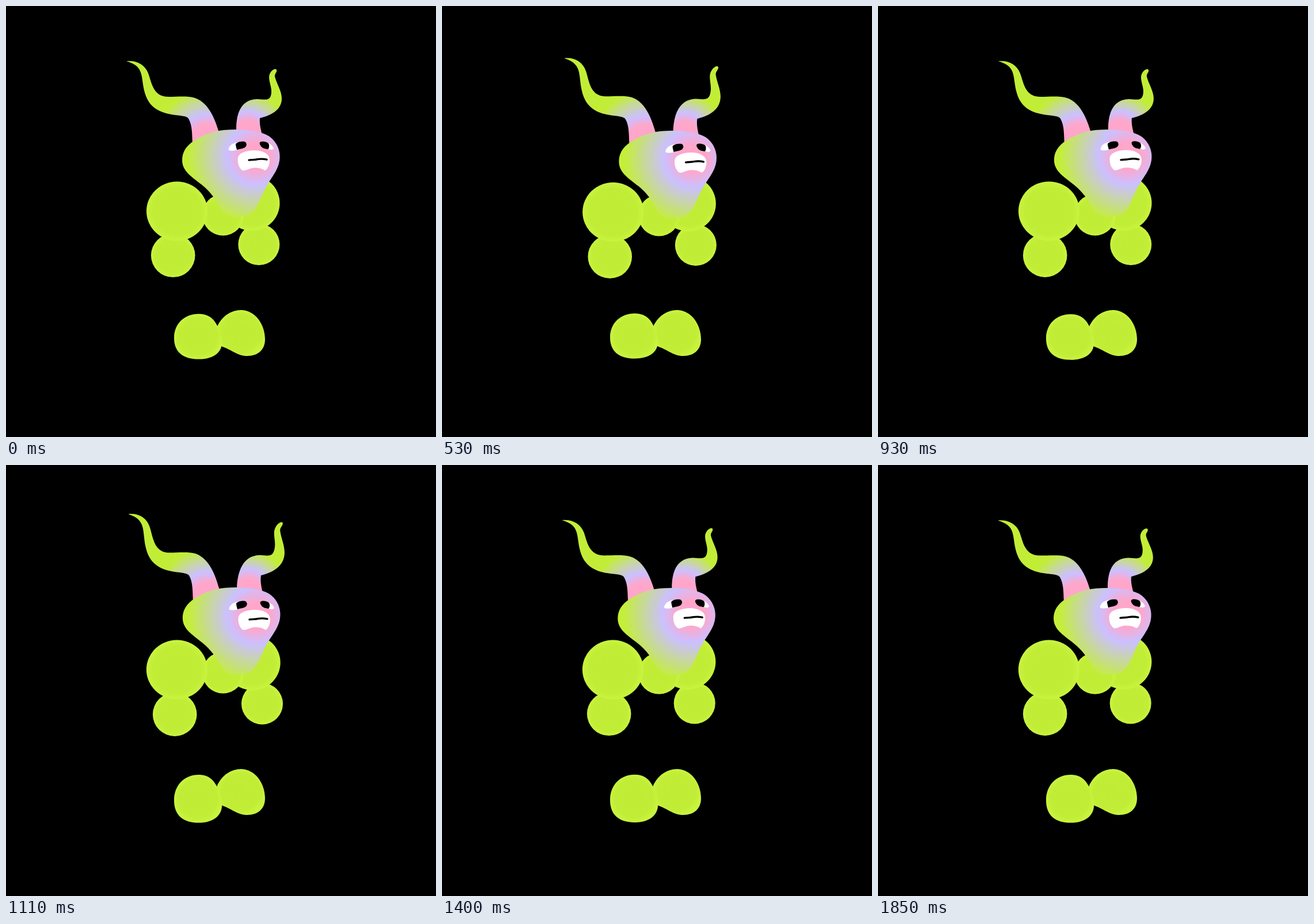
These frames come from a looping animation (747 by 750 pixels, 1.88 s). An HTML page:

```html
<!DOCTYPE html>
<html lang="en">
<head>
<meta charset="utf-8">
<title>Bouncing horned creature</title>
<style>
  html, body { margin: 0; width: 100%; height: 100%; overflow: hidden; background: #000; }
  svg { display: block; width: 100vw; height: 100vh; }
</style>
</head>
<body>
<svg viewBox="0 0 747 750" preserveAspectRatio="none">
  <defs>
    <radialGradient id="ball">
      <stop offset="0" stop-color="#c1ec36"/>
      <stop offset=".8" stop-color="#c2ed37"/>
      <stop offset="1" stop-color="#c8f43f"/>
    </radialGradient>
    <radialGradient id="skin" gradientUnits="userSpaceOnUse" cx="434" cy="261" r="125">
      <stop offset=".18" stop-color="#ffa6ca"/>
      <stop offset=".4" stop-color="#cbc0ff"/>
      <stop offset=".64" stop-color="#c8d5a6"/>
      <stop offset=".95" stop-color="#c4ef38"/>
    </radialGradient>
    <radialGradient id="hornL" gradientUnits="userSpaceOnUse" cx="352" cy="240" r="94">
      <stop offset=".36" stop-color="#ffa6ca"/>
      <stop offset=".55" stop-color="#cbc0ff"/>
      <stop offset=".78" stop-color="#c7d89a"/>
      <stop offset="1" stop-color="#c2ed37"/>
    </radialGradient>
    <radialGradient id="hornR" gradientUnits="userSpaceOnUse" cx="420" cy="222" r="70">
      <stop offset=".32" stop-color="#ffa6ca"/>
      <stop offset=".55" stop-color="#cbc0ff"/>
      <stop offset=".78" stop-color="#c7d89a"/>
      <stop offset="1" stop-color="#c2ed37"/>
    </radialGradient>
  </defs>

  <g fill="url(#ball)">
    <path d="M366,560 C374,540 391,529 409,529 C434,530 450,555 450,580 C450,598 438,609 419,609 C402,609 392,598 374,592Z"/>
    <path id="foot"/>
    <ellipse id="shinR" rx="36" ry="36"/>
    <ellipse id="armR" rx="48.5" ry="48"/>
    <ellipse id="chest" rx="36" ry="36"/>
    <ellipse id="shinL" rx="38.3" ry="38"/>
    <ellipse id="armL" rx="53" ry="51.5"/>
  </g>
  <path id="left" fill="url(#hornL)"/>
  <path id="right" fill="url(#hornR)"/>
  <path id="head" fill="url(#skin)"/>
  <g id="face">
    <path fill="#fff" d="M386.5,249.5 C388,242 394,238 402,237 L401,250.500 C395,252 387,252 386.500,249.500Z M455,238 C460,240 464,244 465,248 C463,251 458,250 453,248Z"/>
    <path d="M399,240 C402,236 410,235 415,236 C418,238 419,242 416,245 C413,248 408,248 401,250 C400,246 399,243 399,240Z M441,237 C445,234 453,236 456,239 C458,242 457,248 455,249 C450,248 446,248 443,244 C441,241 440,239 441,237Z"/>
    <path fill="#fff" d="M402.500,267 C402,256 416,251 432,251 C446,251 458,257 458,268 C458,276 454,284 450,286 C444,282 436,281 430,281.500 C422,282 416,287 411,286 C406,283 402.500,276 402.500,267Z"/>
    <path fill="none" stroke="#000" stroke-width="3.300" stroke-linecap="round" d="M422,268 C428,267 432,268 437,266.500 C443,265.500 448,266 453,267"/>
  </g>
</svg>
<script>
const LOOP = 1880;
const $ = id => document.getElementById(id);

const shapes = {
  foot: 'M292,578 C292,553 310,536 335,536 C358,536 368,552 374,577 C380,601 362,615 335,615 C308,615 292,603 292,578Z',
  head: 'M306,268 C306,250 318,238 336,229 C354,219 372,215 398,215 C425,215 446,220 456,226 C468,234 475.5,247 475.5,262 ' +
    'C475.5,282 464,294 454,311 C444,328 442,338 434,351 C428,361 418,367 402,367 C386,367 379,363 372,351 ' +
    'C363,335 356,324 340,311 C321,296 306,287 306,268Z',
  left: 'M209,96 C225,94 241,101 247,117 C253,133 255,158 282,158 C295,158 306,157 318,158 C347,160 361,190 369,217 ' +
    'L372,232 L324,241 C323,224 324,208 317,196 C314,191 302,191 289,189 C262,185 246,173 240,147 C234,121 240,105 209,96Z',
  right: 'M469,110 C473,114 466,117 467,123 C470,135 479,148 479,161 C479,182 458,191 441,195 C440,204 442,213 445,224 ' +
    'L445,232 L400,232 L400,215 C400,190 406,163 436,162 C449,162 461,168 461,148 C461,140 457,132 457,124 C457,117 463,109 469,110Z'
};

// Phase, then offsets: head x, crown, chin, face y, left tip x, right tip x, tips y,
// left shin x/y, right shin x/y, left arm y, chest y, right arm y, foot top/bottom
const poses = [
  [0, 0, 0, 0, 0, 0, 0, 0, 0, 0, 0, 0, 0, 0, 0, 0, 0],
  [.13, 1.5, 2, 2.5, 4, 2, 8.5, -7, 1.5, 2, 1.5, 1, 1.5, 1, 1, -1, -1.5],
  [.36, 1, -2, -2, 1, 2.5, 10, -8.5, 3, 0, 5.7, .5, -1, -2, 1, 3, 7.5],
  [.55, -4, -9, -10, -14, 0, 5, -.5, 3.5, -3.5, 2.7, -4, -4, -7, -3.5, 4, 9],
  [.61, -4.5, -11, -13, -16, -2, -1.5, 4.5, 1, -8, 3.4, -5, -9, -9.5, -4.5, 4, 9],
  [.94, -1, -1, -1.5, -2, 0, -.5, 1.5, 0, -1, -.6, -.5, -1, -.7, -.5, 3, 7.5],
  [.98, -.8, -1, -1.5, -2, 0, 1, 1, 0, -1, -.6, -.5, -1, -.7, -.5, 3, 7.5]
];

// Slightly uneven pace of the four bounces: time in ms, bounce count
const pace = [[0, 0], [260, .55], [530, 1.13], [740, 1.61], [1110, 2.36], [1400, 2.98], [1850, 3.94], [LOOP, 4]];

function phaseAt(t) {
  const i = pace.findIndex(p => t < p[0]);
  const [t0, p0] = pace[i - 1], [t1, p1] = pace[i];
  return (p0 + (p1 - p0) * (t - t0) / (t1 - t0)) % 1;
}

function poseKey(i) {
  const n = poses.length, turn = Math.floor(i / n), row = poses[i - turn * n];
  return [row[0] + turn, ...row.slice(1)];
}

// Smooth cyclic curve through the poses
function poseAt(p) {
  let i = poses.length - 1;
  while (poses[i][0] > p) i--;
  const [a, b, c, d] = [-1, 0, 1, 2].map(k => poseKey(i + k));
  const h = c[0] - b[0], u = (p - b[0]) / h;
  const slope = (x, y, z, k) => {
    const h0 = y[0] - x[0], h1 = z[0] - y[0];
    const s0 = (y[k] - x[k]) / h0, s1 = (z[k] - y[k]) / h1;
    return ((s0 * h1 + s1 * h0) + (s0 * h0 + s1 * h1)) / (h0 + h1) / 2;
  };
  return b.slice(1).map((v, j) => {
    const k = j + 1, w = c[k];
    const m0 = slope(a, b, c, k) * h, m1 = slope(b, c, d, k) * h;
    const u2 = u * u, u3 = u2 * u;
    return v * (2 * u3 - 3 * u2 + 1) + m0 * (u3 - 2 * u2 + u) + w * (3 * u2 - 2 * u3) + m1 * (u3 - u2);
  });
}

function warp(id, move) {
  $(id).setAttribute('d', shapes[id].replace(/([\d.]+),([\d.]+)/g,
    (_, x, y) => move(+x, +y).map(v => v.toFixed(2)).join()));
}

function place(id, x, y) {
  $(id).setAttribute('cx', x);
  $(id).setAttribute('cy', y);
}

function draw(t) {
  const [hx, crown, chin, faceY, tipL, tipR, tipY, slx, sly, srx, sry, armL, chest, armR, footTop, footEnd] =
    poseAt(phaseAt(t));

  place('shinL', 290.2 + slx, 434 + sly);
  place('shinR', 439.3 + srx, 415 + sry);
  place('armL', 297 + armL * .12, 357 + armL);
  place('armR', 427 + srx * .2, 343 + armR);
  place('chest', 377, 363.5 + chest);

  warp('foot', (x, y) => [x, y + footTop + (footEnd - footTop) * (y - 536) / 79]);
  warp('head', (x, y) => {
    const s = (y - 215) / 152;
    return [x + hx * (1 - .7 * s * s), y + crown + (chin - crown) * s];
  });

  const horn = (id, base, height, tipX) => warp(id, (x, y) => {
    const w = Math.max(0, (base - y) / height) ** 1.6;
    return [x + hx + tipX * w, y + crown + tipY * w];
  });
  horn('left', 237, 141, tipL);
  horn('right', 222, 112, tipR);

  const shift = y => `translate(${hx} ${y})`;
  $('face').setAttribute('transform', shift(faceY));
  $('skin').setAttribute('gradientTransform', shift(faceY));
  $('hornL').setAttribute('gradientTransform', shift(crown));
  $('hornR').setAttribute('gradientTransform', shift(crown));
}

const start = performance.now();
function tick() {
  draw((performance.now() - start) % LOOP);
  requestAnimationFrame(tick);
}
tick();
</script>
</body>
</html>
```
